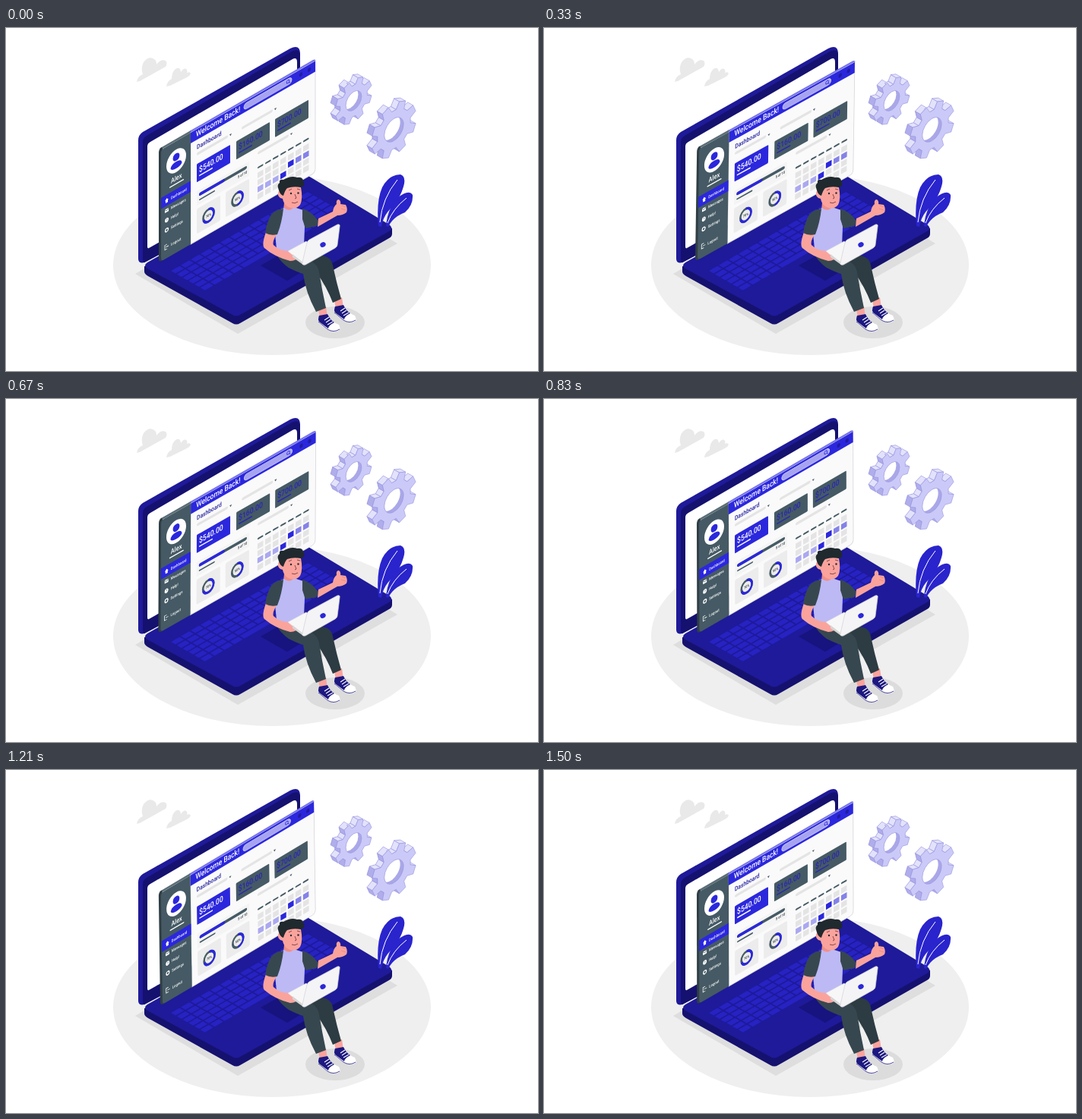
An HTML page for the animation above (1540 ms loop, 700x452 px).

```html
<!DOCTYPE html>
<html lang="en">
<head>
<meta charset="utf-8">
<title>Dashboard</title>
<style>
html, body { margin: 0; width: 100%; height: 100%; overflow: hidden; background: #fff }
svg { display: block; width: 700px; height: 452px }
text { font-family: Roboto, Inter, sans-serif; font-weight: 500 }
</style>
</head>
<body>
<svg viewBox="0 0 700 452">
  <ellipse cx="350" cy="312.500" rx="209" ry="118.500" fill="#efefef"/>
  <g fill="#e9e9e9">
    <path d="M172 71Q173 64 180 61Q177 53 181 45Q188 36 195 41Q198 43 198 48Q204 40 210 43Q213 46 210 51L176 70Z"/>
    <path d="M211 77Q212 70 218 67Q218 58 223 54Q229 50 230 58Q235 51 238 55Q239 57 238 59Q242 57 243 60Q242 63 238 65L216 76Z"/>
  </g>

  <!-- laptop -->
  <path d="M170 324L305 403L515 284L495 272L300 380L190 312Z" fill="#dedede"/>
  <path d="M174 148Q174 141 180 137L374 27Q387 21 387 34V200L182 309Q174 311 174 304Z" fill="#1e1a99"/>
  <path d="M180 151Q180 145 185 142L376 31Q387 26 387 36V200L182 309Q180 309 180 304Z" fill="#15116f"/>
  <path d="M186 156Q186 152 190 150L377 41Q383 38 383 45V180L188 290Q186 291 186 288Z" fill="#fff"/>
  <path d="M182 314V321Q182 324 187 327L298 389Q303 392 308 389L504 277Q508 275 508 271V264Z" fill="#15116f"/>
  <path d="M186 309L388 194Q393 191 398 195L504 259Q511 264 504 268L308 378Q303 381 298 378L186 317Q180 313 186 309Z" fill="#1e1a99"/>
  <path d="M335 313L372 292L406 311L370 333Z" fill="#17137f"/>
  <g id="keys" fill="#2722c2" transform="matrix(.866 -.5 .866 .5 217 320)"></g>

  <!-- floating window -->
  <g id="window"><g id="face" transform="matrix(1 -.577 0 1 243 152)"></g></g>

  <g id="gears"></g>

  <!-- leaves -->
  <g fill="#2924cc">
    <path d="M490 261Q487 228 495 210Q504 193 519 193Q527 196 523 209Q519 224 506 238Q496 248 494 262Z"/>
    <path d="M500 261Q502 238 515 224Q530 212 535 220Q536 233 525 243Q509 249 503 262Z"/>
  </g>
  <path d="M492 256Q495 224 515 200M502 257Q509 238 527 224" fill="none" stroke="#fff" stroke-width="1"/>

  <!-- man -->
  <ellipse cx="433" cy="388" rx="39" ry="21" fill="#dcdcdc"/>
  <g id="shoes"></g>
  <path d="M392 302L415 300Q428 301 430 313Q435 336 441 357L430 362Q422 341 409 323Z" fill="#2d3b42"/>
  <path d="M354 289Q354 303 372 316Q384 322 391 324Q394 348 408 374L421 369Q416 346 412 322Q410 309 395 305L392 287Z" fill="#37474f"/>
  <path d="M366 230L378 233L379 243Q372 248 365 241Z" fill="#f08f89"/>
  <path d="M357 241L366 237Q373 243 379 236L391 240L393 262L392 288Q373 301 356 291Q354 272 352 250Z" fill="#bcb9f5"/>
  <path d="M390 238Q401 241 411 254L409 261L394 264L390 252Z" fill="#37474f"/>
  <path d="M411 251L430 242Q431 235 435 232Q434 226 438 226Q441 228 440 232L447 233Q450 238 448 243Q443 247 436 247L410 262Z" fill="#faa39d"/>
  <path d="M442 234L447 236M441 238L447 240" stroke="#e88983" stroke-width=".8"/>
  <path d="M342 269L356 272Q350 282 352 286Q361 295 376 294L386 300Q383 307 374 307Q354 302 340 290Q336 286 342 269Z" fill="#faa39d"/>
  <path d="M365 238Q353 240 349 246Q343 256 341 270Q348 274 357 272Q363 257 365 238Z" fill="#37474f"/>
  <path d="M363 210Q376 202 388 210Q391 225 387 233Q380 241 370 235Q365 231 364 225Q357 224 358 216Q361 212 363 217Z" fill="#faa39d"/>
  <path d="M365 221Q361 220 359 214Q356 206 360 204Q359 199 365 200Q375 194 383 197Q390 196 391 201Q395 208 388 210Q378 208 370 211Q367 214 365 221Z" fill="#20292e"/>
  <path d="M372 214L376 212M383 212L387 213M376 230Q380 232 384 229M380 219L382 224L380 225" fill="none" stroke="#7b3f40" stroke-width=".9"/>
  <g fill="#20292e"><circle cx="375" cy="218" r="1.2"/><circle cx="384.500" cy="217.500" r="1.2"/></g>
  <path d="M371 294L395 281L408 292L391 311Z" fill="#f7f7f7" stroke="#ddd" stroke-width=".6"/>
  <path d="M377 298L391 309V312L377 302Z" fill="#d6d6d6"/>
  <path d="M399 279L436 259Q440 258 439 262L436 286Q436 288 433 290L394 312Q389 313 390 309L396 283Q397 280 399 279Z" fill="#f4f4f6" stroke="#d2d2d8" stroke-width=".7"/>
  <ellipse cx="417" cy="285.500" rx="3.800" ry="3.200" fill="#2b27d8" transform="rotate(-30 417 285.500)"/>
</svg>
<script>
const BLUE = '#2b27dd', SLATE = '#455a64', GREY = '#e4e4e4', NAVY = '#1c1880';
const $ = id => document.getElementById(id);
const repeat = (n, draw) => Array.from({ length: n }, (_, i) => draw(i)).join('');
const rect = (x, y, w, h, fill, r = 0, more = '') =>
  `<rect x="${x}" y="${y}" width="${w}" height="${h}" rx="${r}" fill="${fill}" ${more}/>`;
const oval = (x, y, rx, ry, fill, more = '') =>
  `<ellipse cx="${x}" cy="${y}" rx="${rx}" ry="${ry}" fill="${fill}" ${more}/>`;
const path = (d, fill, more = '') => `<path d="${d}" fill="${fill}" ${more}/>`;
const label = (x, y, size, fill, words, more = '') =>
  `<text transform="translate(${x} ${y}) scale(.82 1)" font-size="${size}" fill="${fill}" ${more}>${words}</text>`;

const key = (x, row, width = 12) => rect(x, row * 8.9, width, 7, '#2722c2', 1);
$('keys').innerHTML =
  repeat(5, row => repeat(14, i => key(i * 15, row, 13))) +
  repeat(4, i => key(i * 15, 5, 13)) + key(60, 5, 73) + repeat(5, i => key(135 + i * 15, 5, 13));

function card(x, fill, ink, amount) {
  return rect(x, 32, 44, 24, fill, 1) + label(x + 3, 44.8, 10.5, ink, amount) +
    rect(x + 3, 48.3, 18, 1.6, ink, .8);
}

function donut(x, percent) {
  const ring = (color, dash) => `<circle r="7.5" fill="none" stroke="${color}" stroke-width="2.800" pathLength="100"
    stroke-dasharray="${dash} 100" transform="translate(${x} 108.500) scale(.93 1.07) rotate(-90)"/>`;
  return rect(x - 15.5, 91, 31, 33, '#ececec', 2) + ring(SLATE, 100) + ring(BLUE, percent) +
    label(x, 110.2, 4.6, '#263238', percent + '%', 'text-anchor="middle"');
}

function calendar() {
  const shade = day => day === 11 || day === 17 ? BLUE
    : day > 11 && day < 14 ? '#8582e8' : day > 13 && day < 17 ? '#aaa8f0' : GREY;
  return repeat(7, i => rect(88 + i * 10, 82, 7.5, 2.2, SLATE, 1)) +
    repeat(28, i => rect(88 + i % 7 * 10, 89.5 + Math.floor(i / 7) * 9.4, 7.5, 7.2, shade(i)));
}

const menu = [['Dashboard', 57], ['Messages', 70], ['Help!', 83], ['Settings', 96], ['Logout', 118]];
const icons = [
  path('M-34 57L-31.500 54L-29 57H-30V60H-33V57Z', '#fff'),
  rect(-34, 68, 5, 4.5, '#fff', .6) + path('M-34 68.500L-31.500 70.500L-29 68.500', 'none', `stroke="${SLATE}" stroke-width=".6"`),
  oval(-31.5, 83, 2.5, 2.9, '#fff') + label(-32.3, 84.6, 4.5, SLATE, '?'),
  oval(-31.5, 96, 1.9, 2.2, 'none', 'stroke="#fff" stroke-width="1.400"'),
  path('M-31 115H-34V121H-31M-32.500 118H-29', 'none', 'stroke="#fff" stroke-width=".8"')
];

$('face').innerHTML =
  path('M0 -14L-1 -17H161Q164 -17 164.500 -14Z', '#7774ee') +
  path('M-40 -14Q-42 -17 -38 -17H0V-14Z', '#5a6d76') +
  path('M-38 -17Q-42 -17 -42 -12V128Q-42 133 -37 133V-14Z', '#303e45') +
  path('M0 -14H164V128Q164 133 159 133H0Z', '#fafafa', 'stroke="#d5d5dc" stroke-width=".8"') +
  path('M0 -14H164V0H0Z', BLUE) +
  path('M0 -14H-35Q-39 -14 -39 -10V129Q-39 133 -35 133H0Z', SLATE) +
  label(7, -4.3, 10.3, '#fff', 'Welcome Back!') +
  rect(70, -11.2, 63, 8, '#a6a4f1', 4, 'stroke="#cfcdfa" stroke-width=".8"') +
  oval(128, -7.5, 1.8, 2, 'none', `stroke="${BLUE}" stroke-width=".8"`) +
  path('M129 -6L131 -4.500', 'none', `stroke="${BLUE}" stroke-width=".8"`) +
  oval(145, -7, 2.2, 2.6, '#211d9d') + oval(156, -7, 2.2, 2.6, '#211d9d') +
  // sidebar
  oval(-19, 12, 13, 15, '#fff') + oval(-19, 7, 4.4, 4.9, BLUE) +
  path('M-26.500 18.500Q-26 13 -19 13Q-12 13 -11.500 18.500Q-13 22 -19 22Q-25 22 -26.500 18.500Z', BLUE) +
  label(-26, 38, 9, '#fff', 'Alex') + rect(-28, 41.5, 19, 1.5, '#fff', .7) +
  rect(-39, 49.5, 39, 14.5, BLUE) +
  menu.map(([name, y], i) => label(-26, y + 2, 5.2, '#fff', name) + (icons[i])).join('') +
  // content
  label(8, 12.6, 8.2, '#211d9d', 'Dashboard') +
  [[8, 19], [67, 19], [88, 64]].map(([x, y]) => rect(x, y - 1.8, 41, 3.6, GREY, 1.8) +
    path(`M${x + 43} ${y - 1}h3l-1.500 2.500z`, SLATE)).join('') +
  card(8, BLUE, '#fff', '$540.00') +
  card(60, SLATE, '#2925b5', '$160.00') +
  card(111, SLATE, '#2925b5', '$700.00') +
  rect(8, 68, 69, 19, '#f4f4f4', 1) +
  rect(11, 72, 63, 4, SLATE, 2) + rect(11, 72, 34, 4, BLUE, 2) +
  rect(11, 80, 21, 1.8, SLATE, .9) + label(62, 82, 4.8, '#263238', '5 of 10') +
  donut(23.5, 70) + donut(61.5, 50) + calendar();

function gear(x, y, radius) {
  const teeth = 8, corners = [[-.33, .74], [-.19, 1], [.19, 1], [.33, .74]];
  const iso = (u, v) => [x + .866 * u, y - .5 * u + v];
  const outline = [];
  for (let i = 0; i < teeth; i++)
    for (const [part, scale] of corners) {
      const a = (i + .5 + part) * Math.PI * 2 / teeth, r = radius * scale;
      outline.push(iso(r * Math.cos(a), r * Math.sin(a)));
    }
  const shape = points => `M${points.map(p => p.map(n => n.toFixed(1)).join(' ')).join('L')}Z`;
  const back = ([px, py]) => [px - 7, py - 4];
  const line = 'stroke="#9592df" stroke-width=".6" stroke-linejoin="round"';
  // Side walls that face the viewer: bright on top, dark on the left.
  const walls = outline.map((p, i) => {
    const q = outline[(i + 1) % outline.length], dx = q[0] - p[0], dy = q[1] - p[1];
    if (dy * -7 + dx * 4 <= 0) return '';
    return path(shape([p, q, back(q), back(p)]), dx > Math.abs(dy) * .35 ? '#e3e2fb' : '#b0adeb', line);
  }).join('');
  const hole = radius * .43, id = 'hole' + radius;
  const ring = (dx, dy, fill, more = '') =>
    `<circle r="${hole}" fill="${fill}" transform="matrix(.866 -.5 0 1 ${x + dx} ${y + dy})" ${more}/>`;
  return path(shape(outline.map(back)), '#b0adeb') + walls + path(shape(outline), '#cbc9f7', line) +
    `<clipPath id="${id}">${ring(0, 0, '#000')}</clipPath><g clip-path="url(#${id})">` +
    ring(0, 0, '#aaa7e8') + ring(-4.5, -2.6, '#fff') + '</g>' + ring(0, 0, 'none', line);
}
$('gears').innerHTML = gear(457.5, 96, 28) + gear(510.5, 134, 34);

const shoe = (x, y) => `<g transform="translate(${x} ${y})">` +
  path('M0 -6L10 -10L12 4L2 5Z', '#faa39d') +
  path('M1 3L12 1Q17 10 27 14Q30 19 27 22Q19 25 11 20L1 12Q-1 8 1 3Z', '#fff') +
  path('M1 2L12 0Q16 8 21 11Q14 14 13 19L1 10Q-1 7 1 2Z', NAVY) +
  path('M8 8L14 4M10 11L16 7M12 14L19 10', 'none', 'stroke="#fff" stroke-width="1.100"') +
  path('M0 10L12 20Q20 25 28 20', 'none', `stroke="${NAVY}" stroke-width=".8"`) + '</g>';
$('shoes').innerHTML = shoe(411, 377) + shoe(432, 365);

// Sway: linear from 0 to +1 degree, to -1 degree, and back.
const LOOP = 1540;
function frame(now) {
  const p = (now % LOOP) / LOOP;
  const angle = p < .25 ? p * 4 : p < .75 ? 2 - p * 4 : p * 4 - 4;
  $('window').setAttribute('transform', `rotate(${angle.toFixed(4)} 304.5 174)`);
  requestAnimationFrame(frame);
}
requestAnimationFrame(frame);
</script>
</body>
</html>
```
